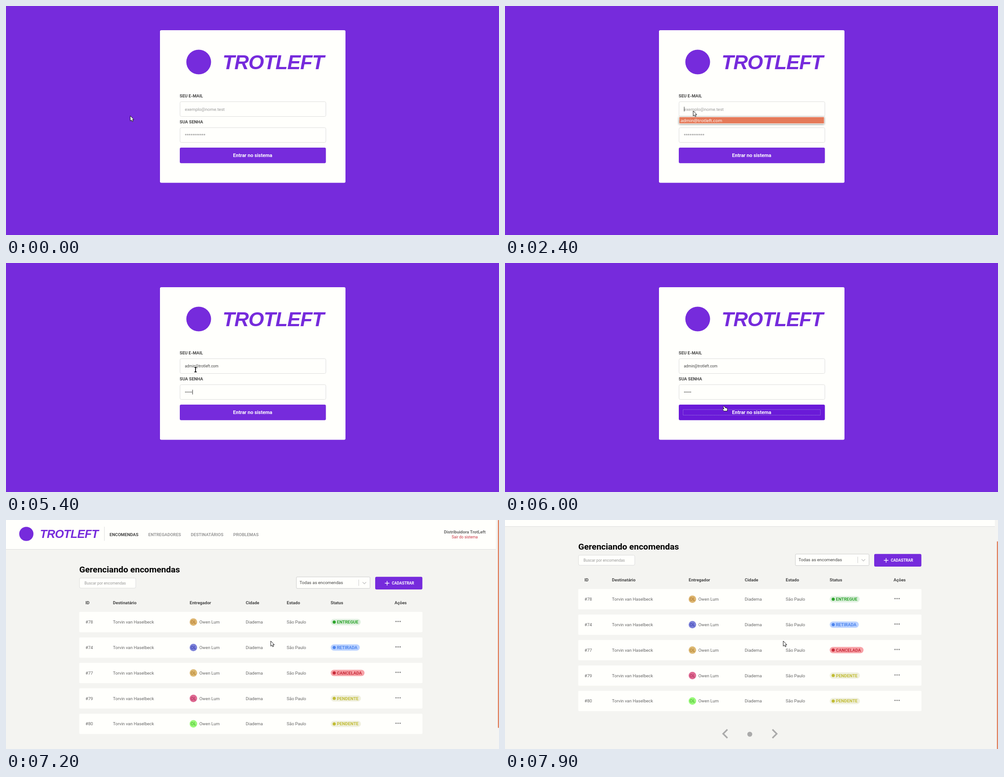
Animation, 1095 px wide and 511 px high, one loop 8000 ms. Source, as an HTML page:

```html
<!DOCTYPE html>
<html lang="pt-BR">
<head>
<meta charset="utf-8">
<title>Entrar</title>
<style>
html, body { margin: 0; width: 100%; height: 100%; overflow: hidden; background: #f4f4f1; }
svg { display: block; }
text { font-family: Roboto, sans-serif; white-space: pre; }
.b { font-weight: 700; }
.mid { text-anchor: middle; }
.word { font: italic 700 44.5px "Liberation Sans", Arial, sans-serif; letter-spacing: -.9px; }
.noto { font-family: "Noto Sans", sans-serif; }
</style>
</head>
<body>
<svg id="stage" width="1095" height="511" viewBox="0 0 1095 511"></svg>
<script>
const PURPLE = '#762bdc', WHITE = '#fffffc', DARK = '#444', GREY = '#999';
const BRAND = 'TrotLeft', EMAIL = 'admin@trotleft.com';

const text = (x, y, s, size, fill, cls = '', id = '') =>
  `<text x="${x}" y="${y}" font-size="${size}" fill="${fill}" class="${cls}" id="${id}">${s}</text>`;
const rect = (x, y, w, h, fill, r = 0, more = '') =>
  `<rect x="${x}" y="${y}" width="${w}" height="${h}" rx="${r}" fill="${fill}" ${more}/>`;
const dot = (x, y, r, fill) => `<circle cx="${x}" cy="${y}" r="${r}" fill="${fill}"/>`;
const line = (d, color, w = 1) => `<path d="${d}" fill="none" stroke="${color}" stroke-width="${w}"/>`;
const group = (id, body) => `<g id="${id}">${body}</g>`;
const field = (x, y, w, h, r = 3, color = '#ddd') => rect(x, y, w, h, WHITE, r, `stroke="${color}"`);

const logo = dot(428, 125, 27.5, PURPLE) +
  `<text x="481" y="141" fill="${PURPLE}" class="word">${BRAND.toUpperCase()}</text>`;

const login = rect(0, 0, 1095, 511, PURPLE) + rect(342, 54, 412, 340.5, WHITE, 3) + logo +
  text(385.8, 204, 'SEU E-MAIL', 9.5, DARK, 'b') + field(386.5, 213.5, 324, 33) +
  text(397.3, 233.5, 'exemplo@nome.test', 9.65, GREY, '', 'mailHint') +
  text(397.3, 233, EMAIL, 8.4, DARK, '', 'mail') +
  text(385.8, 262.2, 'SUA SENHA', 9.5, DARK, 'b') + field(386.5, 271.5, 324, 33) +
  text(397.3, 292, '*'.repeat(11), 9.65, '#888', '', 'passHint') +
  text(397.3, 291, '', 8.2, '#333', '', 'pass') +
  rect(386, 316, 324.5, 34.7, PURPLE, 3, 'id="enter"') +
  rect(395.5, 327, 305, 12.5, 'none', 0, 'id="focus" stroke="#a58ae0" stroke-dasharray="1 .6" stroke-width=".9"') +
  text(547.8, 337, 'Entrar no sistema', 11, '#fff', 'b mid') +
  group('popup', rect(386.5, 247, 322.5, 16, WHITE, 0, 'style="filter:drop-shadow(0 1px 2px #0007)"') +
    rect(387.3, 248, 321.2, 14, '#e57a5a', 0, 'id="pick"') +
    text(390, 258.8, EMAIL, 9.8, DARK, 'noto', 'pickText')) +
  rect(0, 0, .9, 10.5, '#222', 0, 'id="caret"');

const STATUS = {
  ENTREGUE: ['#2ca42b', '#dff0df', 66.5], RETIRADA: ['#4d85ee', '#bad2ff', 64.5],
  CANCELADA: ['#c82c3a', '#f7a3a8', 75], PENDENTE: ['#c1bc35', '#f0f0df', 67]
};
const ROWS = [
  [78, 'ENTREGUE', '#dcb46e', '#a86a1c'], [74, 'RETIRADA', '#7b80d8', '#2b2fa8'],
  [77, 'CANCELADA', '#dcb872', '#a8721c'], [79, 'PENDENTE', '#de6a92', '#a8204c'],
  [80, 'PENDENTE', '#98f878', '#38a820']
];
const HEADS = ['ID', 'Destinatário', 'Entregador', 'Cidade', 'Estado', 'Status', 'Ações'];

function row([id, status, light, deep], i) {
  const y = 227.7 + 56.8 * i, base = y + 3.4;
  const [ink, tint, w] = STATUS[status];
  const cell = (x, s) => text(x, base, s, 9.6, '#666');
  return rect(162.7, y - 22.6, 762.3, 45.3, WHITE, 2) +
    cell(176.5, '#' + id) + cell(237.5, 'Torvin van Haselbeck') +
    dot(416.2, y, 8.3, light) + text(416.2, base, 'OL', 9.6, deep, 'mid') +
    cell(429.5, 'Owen Lum') + cell(532.5, 'Diadema') + cell(623.5, 'São Paulo') +
    rect(721.3, y - 7, w, 14, tint, 7) + dot(729, y, 3.5, ink) + text(735, base, status, 9.6, ink, 'b') +
    [866.3, 870.8, 875.3].map(x => dot(x, y - 1.3, 1.4, '#777')).join('');
}

// The loaded page is narrower, because a scrollbar takes room on the right.
function dashboard(loaded) {
  const left = loaded ? -1.3 : 0, right = loaded ? -7 : 0, mid = loaded ? -4 : 0;
  const columns = loaded ? [176.5, 237.5, 408, 532.5, 623.5, 721, 863] : [178, 245, 392.5, 531.5, 637.5, 743, 845];
  const shift = (x, y, body) => `<g transform="translate(${x} ${y})">${body}</g>`;
  const nav = [['ENCOMENDAS', 230], ['ENTREGADORES', 316], ['DESTINATÁRIOS', 410.5], ['PROBLEMAS', 504.7]];
  return rect(0, 0, 1095, 65, WHITE) + rect(0, 65, 1095, 1, '#ddd') +
    `<g transform="translate(-200.95 -40.9) scale(.575)">${logo}</g>` + rect(218, 15, 1, 31.5, '#ddd') +
    nav.map(([s, x], i) => text(x, 35.6, s, 9.6, i ? GREY : DARK, 'b')).join('') +
    shift(right - (loaded ? .8 : 0), 0, text(1026.8, 30.3, 'Distribuidora ' + BRAND, 9.6, '#666', 'b mid') +
      text(1026.8, 41.3, 'Sair do sistema', 8.4, '#c83040', 'mid')) +
    shift(left, 0, text(164, 117, 'Gerenciando encomendas', 19.1, '#000', 'b') +
      field(164.5, 129.5, 125, 22.5) + text(175.5, 143.9, 'Buscar por encomendas', 8.5, GREY)) +
    shift(right, 0, field(652, 127, 163.5, 25.7, 2, '#ccc') +
      text(659, 143.3, 'Todas as encomendas', 9.6, DARK) +
      line('M790.5 133V147', '#ccc') + line('M799 138.6l4 4 4-4', '#c4c4c4', 1.4) +
      rect(827, 126.7, 104.8, 28.2, PURPLE, 3) + line('M848.5 141h10M853.5 136v10', '#fff', 1.4) +
      text(864, 144, 'CADASTRAR', 8.5, '#fff', 'b')) +
    HEADS.map((s, i) => text(columns[i], 188.4, s, 9.6, DARK, 'b')).join('') +
    (loaded ? ROWS.map(row).join('') : '') +
    shift(mid, loaded ? 284.5 : 0, line('M498 234l-9.5 9.5 9.5 9.5M598 234l9.5 9.5-9.5 9.5', '#aaa', 3.4) +
      dot(547.7, 244.5, 5.5, '#aaa'));
}

const outlined = 'fill="#fff" stroke="#111" stroke-width="1" stroke-linejoin="round"';
const beam = 'M-2.6-5.2H-.8L0-4.6 .8-5.2H2.6M0-5V5M-2.6 5.2H-.8L0 4.6 .8 5.2H2.6';
const cursors =
  group('arrow', `<path ${outlined} d="M0 0V11.5L2.6 9.2 4.4 13 6.4 12 4.7 8.4H8Z"/>`) +
  group('ibeam', line(beam, '#fff', 3.2) + line(beam, '#111', 1.8)) +
  group('hand', `<path ${outlined} d="M-2 1.5Q-1 0 .6 1.2L2.5 4 6.5 5.2Q8 6 7.6 8L7 11.5H0L-3.6 8Q-3.5 6.4-1.5 6.8L0 7.2Z"/>`);

document.getElementById('stage').innerHTML = group('login', login) +
  group('empty', rect(0, 0, 1095, 511, '#f4f4f1') + dashboard(false)) +
  group('loaded', rect(0, 0, 1095, 511, '#f4f4f1') + group('page', dashboard(true)) +
    rect(1088, 0, 7, 511, '#f4f4f2') + rect(1092.6, 0, 2.4, 464, '#e0805c', 1.2, 'id="thumb"')) + cursors;

const $ = id => document.getElementById(id);
const show = (id, on) => { $(id).style.display = on ? '' : 'none'; };
const move = (id, x, y) => $(id).setAttribute('transform', `translate(${x} ${y})`);
const latest = (steps, t) => steps.filter(s => s[0] <= t).pop();

// time, x, y, shape
const POINTER = [
  [0, 276, 245, 'arrow'], [500, 283, 247, 'arrow'], [600, 310, 256, 'arrow'], [700, 327.5, 261, 'arrow'],
  [1000, 340, 258, 'arrow'], [1100, 374, 248, 'arrow'], [1200, 404, 239, 'ibeam'], [1300, 419.5, 236, 'ibeam'],
  [1800, 418, 234, 'arrow'], [2900, 419.5, 236, 'ibeam'], [5400, 421, 238, 'ibeam'], [5500, 428, 254, 'arrow'],
  [5600, 445, 280, 'ibeam'], [5700, 464, 299, 'ibeam'], [5800, 478, 310, 'arrow'], [5900, 486.5, 318.8, 'hand'],
  [6300, 487, 320, 'arrow'], [6600, 487, 317, 'arrow'], [6900, 492, 310, 'arrow'], [7000, 520, 296, 'arrow'],
  [7100, 556, 282, 'arrow'], [7200, 588, 270, 'arrow'], [7300, 606, 265, 'arrow'], [7400, 611, 265, 'arrow'],
  [7500, 613, 267, 'arrow'], [7700, 615, 268, 'arrow'], [7800, 617, 269, 'arrow'], [7900, 618, 270, 'arrow']
];
const SCROLL = [[0, 0], [7300, 12], [7400, 31], [7500, 47], [7700, 49], [7800, 50], [7900, 51]];
const TYPED = [[0, 0], [3600, 1], [4000, 2], [4100, 4], [4200, 5], [4600, 6]];

function draw(t) {
  show('login', t < 6300);
  show('empty', t >= 6300 && t < 6400);
  show('loaded', t >= 6400);

  const typed = latest(TYPED, t)[1], filled = t >= 2900, clicked = t >= 6000, picked = t >= 2400;
  show('mailHint', !filled);
  show('mail', filled);
  show('passHint', !typed);
  $('pass').textContent = '•'.repeat(typed);
  show('popup', t >= 1800 && !filled);
  show('pick', picked);
  $('pickText').setAttribute('fill', picked ? '#fff' : DARK);
  $('enter').setAttribute('fill', t >= 5900 ? '#6a1ad8' : PURPLE);
  show('focus', clicked);

  show('caret', t >= 1800 && !clicked && !(t >= 3300 && t < 3400));
  if (t >= 3300) move('caret', 397.6 + 2.75 * typed, 282.8);
  else move('caret', 397.6 + (filled ? $('mail').getComputedTextLength() : 0), 224.8);

  const scroll = latest(SCROLL, t)[1];
  move('page', 0, -scroll);
  move('thumb', 0, scroll * .93);

  const [, x, y, shape] = latest(POINTER, t);
  for (const id of ['arrow', 'ibeam', 'hand']) show(id, id === shape);
  move(shape, x, y);
}

(function loop() {
  draw(performance.now() % 8000);
  requestAnimationFrame(loop);
})();
</script>
</body>
</html>
```
